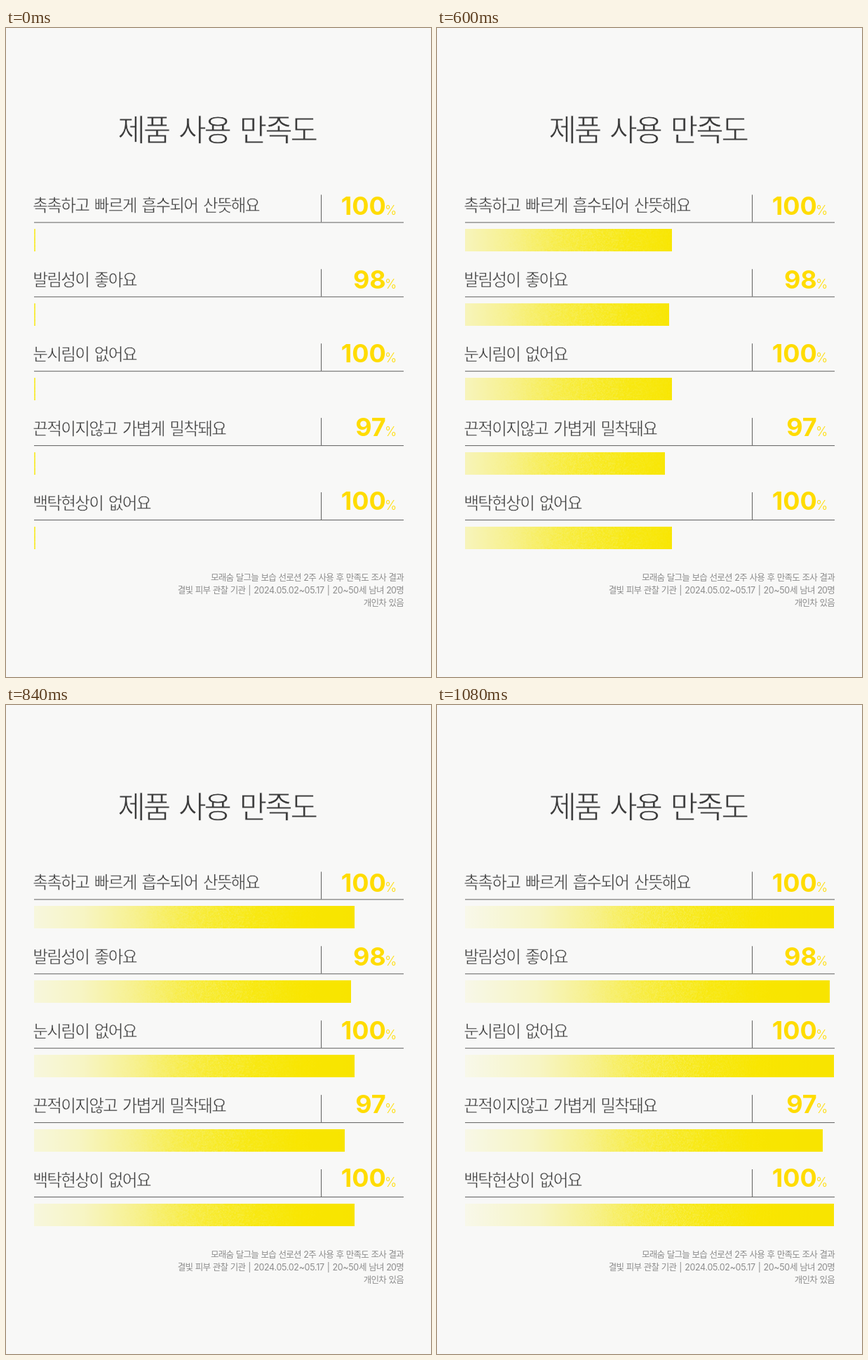
Recreate the animation shown at these times as an HTML page with a canvas. Size 606 by 924 pixels, loop 2080 ms.

```html
<!DOCTYPE html>
<html lang="ko">
<head>
<meta charset="utf-8">
<title>제품 사용 만족도</title>
<style>
  html, body { margin: 0; width: 100%; height: 100%; overflow: hidden; background: #f8f8f7; }
  canvas, svg { position: absolute; left: 0; top: 0; width: 606px; height: 924px; }
  /* The background-coloured outline thins the strokes to a light weight. */
  .title, .label {
    font-family: "Noto Sans CJK KR", "Noto Sans CJK", sans-serif;
    letter-spacing: -.074em;
    word-spacing: .12em;
    fill: #3c3c3c;
    stroke: #f8f8f7;
    stroke-width: .02em;
  }
  .title { font-size: 43px; }
  .label { font-size: 23.6px; }
  .score, .unit { font-family: Inter, sans-serif; fill: #ffdc00; text-anchor: end; }
  .score { font-size: 36px; font-weight: 700; }
  .unit { font-size: 18px; font-weight: 300; }
  .note {
    font: 12.5px Inter, "Noto Sans CJK KR", "Noto Sans CJK", sans-serif;
    letter-spacing: -.06em;
    word-spacing: .06em;
    fill: #8c8c8c;
    text-anchor: end;
  }
  .latin { letter-spacing: -.025em; }
  .rule { fill: #606060; }
</style>
</head>
<body>
<canvas width="606" height="924"></canvas>
<svg viewBox="0 0 606 924">
  <text class="title" x="159.3" y="161">제품 사용 만족도</text>
  <g id="rows"></g>
  <text class="note" x="567" y="787">모래숨 달그늘 보습 선로션 2주 사용 후 만족도 조사 결과</text>
  <text class="note" x="567" y="805">결빛 피부 관찰 기관<tspan class="latin"> | 2024.05.02~05.17 | 20~50</tspan>세 남녀 20명</text>
  <text class="note" x="567" y="823">개인차 있음</text>
</svg>
<script>
const LOOP = 2080, STEP = 40, STEPS = 20, GROW_START = 280;
const BAR_WIDTH = 526, BAR_HEIGHT = 32, BAR_LEFT = 40, MIN_WIDTH = 1.6;

const rows = [
  { label: "촉촉하고 빠르게 흡수되어 산뜻해요", score: 100, length: 526 },
  { label: "발림성이 좋아요", score: 98, length: 519.5 },
  { label: "눈시림이 없어요", score: 100, length: 526 },
  { label: "끈적이지않고 가볍게 밀착돼요", score: 97, length: 509.5 },
  { label: "백탁현상이 없어요", score: 100, length: 526 },
];

document.getElementById("rows").innerHTML = rows.map(({ label, score }, i) => {
  const lineY = 276.4 + 105.9 * i;
  const scoreY = 265.6 + 105 * i;
  return `
    <text class="label" x="38.3" y="${261 + 105.9 * i}">${label}</text>
    <text class="score" x="541.8" y="${scoreY}">${score}</text>
    <text class="unit" x="557" y="${scoreY}">%</text>
    <rect class="rule" x="40" y="${lineY}" width="527" height="1"/>
    <rect class="rule" x="449" y="${lineY - 39}" width="1" height="39"/>`;
}).join("");

function seededRandom(seed) {
  return () => (seed = (seed * 16807) % 2147483647) / 2147483647;
}

// Pale-to-yellow gradient with light grain gathered around the middle.
function makeTexture() {
  const texture = document.createElement("canvas");
  texture.width = BAR_WIDTH;
  texture.height = BAR_HEIGHT;
  const ctx = texture.getContext("2d");
  const gradient = ctx.createLinearGradient(0, 0, BAR_WIDTH, 0);
  const stops = [
    [0, "#f8f8ea"], [.2, "#f7f5c4"], [.35, "#f7f18f"], [.5, "#f8ed45"],
    [.65, "#f8e914"], [.8, "#f9e600"], [1, "#f8e400"],
  ];
  stops.forEach(([at, color]) => gradient.addColorStop(at, color));
  ctx.fillStyle = gradient;
  ctx.fillRect(0, 0, BAR_WIDTH, BAR_HEIGHT);

  const random = seededRandom(7);
  for (let x = 0; x < BAR_WIDTH; x++) {
    const density = Math.exp(-(((x / BAR_WIDTH - .56) / .17) ** 2));
    for (let y = 0; y < BAR_HEIGHT; y++) {
      const grain = random();
      const tone = random() < .5 ? "247,243,150" : "249,232,10";
      ctx.fillStyle = `rgba(${tone},${.45 * grain * density})`;
      ctx.fillRect(x, y, 1, 1);
    }
  }
  return texture;
}

// Fast start, soft landing.
function growth(time) {
  const step = Math.min(STEPS, Math.max(0, Math.floor((time - GROW_START) / STEP)));
  const left = 1 - step / STEPS;
  return 1 - Math.min(1, left * left * (1.767 - 1.16 * left + .429 * left * left));
}

const texture = makeTexture();
const stage = document.querySelector("canvas").getContext("2d");

function draw() {
  const progress = growth(performance.now() % LOOP);
  stage.clearRect(0, 0, 606, 924);
  rows.forEach(({ length }, i) => {
    const width = MIN_WIDTH + (length - MIN_WIDTH) * progress;
    // The texture stays centred on the bar as its edges open.
    stage.drawImage(texture, (BAR_WIDTH - width) / 2, 0, width, BAR_HEIGHT,
      BAR_LEFT, 285.5 + 106 * i, width, BAR_HEIGHT);
  });
  requestAnimationFrame(draw);
}
draw();
</script>
</body>
</html>
```
